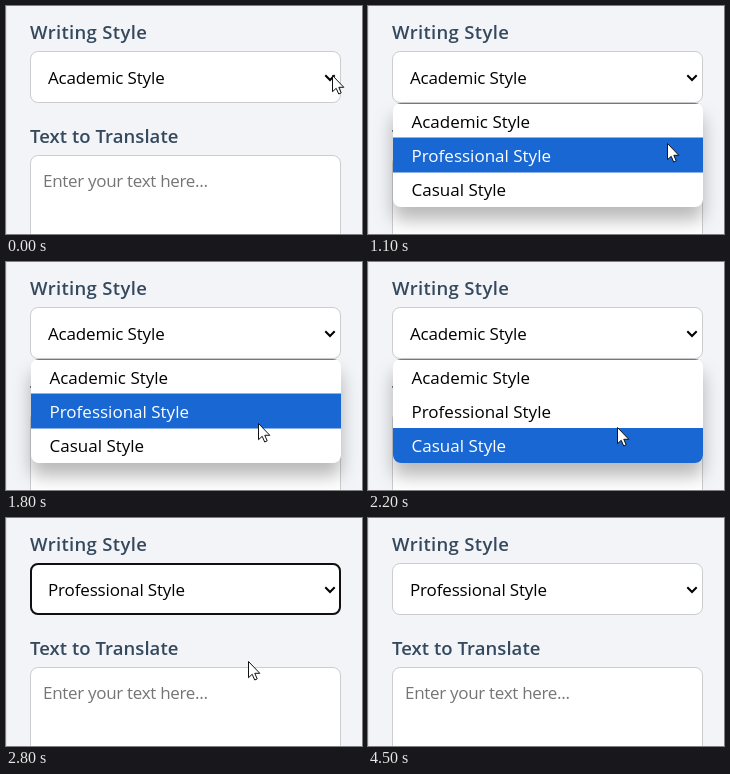
Animation of 356 by 228 pixels, one loop 4.6 s. Source, as an HTML page:

```html
<!DOCTYPE html>
<html lang="en">
<head>
<meta charset="utf-8">
<title>Writing style menu</title>
<style>
  html, body { margin: 0; width: 100%; height: 100%; overflow: hidden; background: #f3f4f7; }
  svg { display: block; width: 100vw; height: 100vh; }
  text { font: 400 17px "Open Sans", "Noto Sans", sans-serif; fill: #000; }
  .label { font-size: 18.5px; font-weight: 600; fill: #34495e; }
  .hint { fill: #757575; letter-spacing: -.3px; }
  .value { letter-spacing: -.15px; }
  .field { fill: #fff; stroke: #cccdd0; }
  .popup { fill: #fff; filter: drop-shadow(0 13px 9px rgba(0, 0, 0, .28)); }
</style>
</head>
<body>
<svg viewBox="0 0 356 228">
  <defs>
    <clipPath id="popupClip"><rect x="25" y="97" width="310" height="104" rx="8"/></clipPath>
  </defs>
  <rect width="356" height="228" fill="#f3f4f7"/>
  <rect width="1" height="228" fill="#dfe1e5"/>

  <text class="label" x="24" y="33" letter-spacing=".33">Writing Style</text>
  <rect class="field" x="24.5" y="45.5" width="310" height="51" rx="7.5"/>
  <rect id="ring" x="25" y="46" width="309" height="50" rx="7" fill="none" stroke="#101010" stroke-width="2"/>
  <text id="value" class="value" x="42" y="78"></text>
  <path d="M319.3 69.3l4.7 4.7 4.7-4.7" fill="none" stroke="#000" stroke-width="2"/>

  <text class="label" x="24" y="137" letter-spacing=".05">Text to Translate</text>
  <rect class="field" x="24.5" y="149.5" width="310" height="120" rx="7.5"/>
  <text class="hint" x="37" y="181">Enter your text here...</text>

  <g id="popup">
    <rect class="popup" x="25" y="97" width="310" height="104" rx="8"/>
    <g clip-path="url(#popupClip)">
      <rect x="25" y="97" width="310" height="1" fill="#777"/>
      <rect id="bar" x="25" width="310" height="35" fill="#1967d2"/>
    </g>
    <g id="rows"></g>
  </g>

  <path id="cursor" d="M0 0V16.2L3.7 12.8 6.2 18.5 8.7 17.4 6.3 11.8H11.3Z" fill="#fff" stroke="#111" stroke-linejoin="round"/>
</svg>
<script>
  const LOOP = 4600, STEP = 100;
  const OPEN = 300, CLOSE = 2700, HIDE = 3800, BLUR = 4500;
  const ROW_TOP = 97, ROW_H = 34.5;
  const options = ["Academic Style", "Professional Style", "Casual Style"];

  // Places the pointer heads for, each reached with an ease-out
  const stops = [
    { t: 300, x: 326, y: 70 },
    { t: 1100, x: 299, y: 138 },
    { t: 1500, x: 260, y: 124 },
    { t: 2000, x: 251, y: 169 },
    { t: 2200, x: 249, y: 166 },
    { t: 2400, x: 242, y: 144 },
    { t: 2900, x: 242, y: 144 },
    { t: 3200, x: 332, y: 160 },
    { t: 3400, x: 257, y: 137 },
    { t: 3700, x: 188, y: 110 }
  ];

  const el = id => document.getElementById(id);
  const show = (node, on) => node.setAttribute("visibility", on ? "visible" : "hidden");
  const clamp = (v, lo, hi) => Math.min(hi, Math.max(lo, v));
  const easeOut = k => 1 - (1 - k) ** 2;

  const rows = options.map((name, i) => {
    const row = document.createElementNS("http://www.w3.org/2000/svg", "text");
    row.setAttribute("x", 43.5);
    row.setAttribute("y", 122 + 34 * i);
    row.textContent = name;
    return el("rows").appendChild(row);
  });

  function pointerAt(t) {
    const i = stops.findIndex(s => s.t > t);
    const b = stops.at(i), a = i > 0 ? stops[i - 1] : b;
    const k = a === b ? 1 : easeOut((t - a.t) / (b.t - a.t));
    const mix = (from, to) => Math.round(from + (to - from) * k);
    return { x: mix(a.x, b.x), y: mix(a.y, b.y) };
  }

  function draw(time) {
    const t = Math.floor((time % LOOP) / STEP) * STEP;
    const { x, y } = pointerAt(t);
    const hover = clamp(Math.floor((y - ROW_TOP) / ROW_H), 0, 2);

    el("value").textContent = options[t < CLOSE ? 0 : 1];
    show(el("ring"), t >= CLOSE && t < BLUR);
    show(el("popup"), t >= OPEN && t < CLOSE);
    el("bar").setAttribute("y", ROW_TOP + ROW_H * hover);
    rows.forEach((row, i) => { row.style.fill = i === hover ? "#fff" : "#000"; });
    show(el("cursor"), t < HIDE);
    el("cursor").setAttribute("transform", `translate(${x + 0.5} ${y - 0.5})`);
  }

  let start;
  function tick(now) {
    start ??= now;
    draw(now - start);
    requestAnimationFrame(tick);
  }
  draw(0);
  requestAnimationFrame(tick);
</script>
</body>
</html>
```
